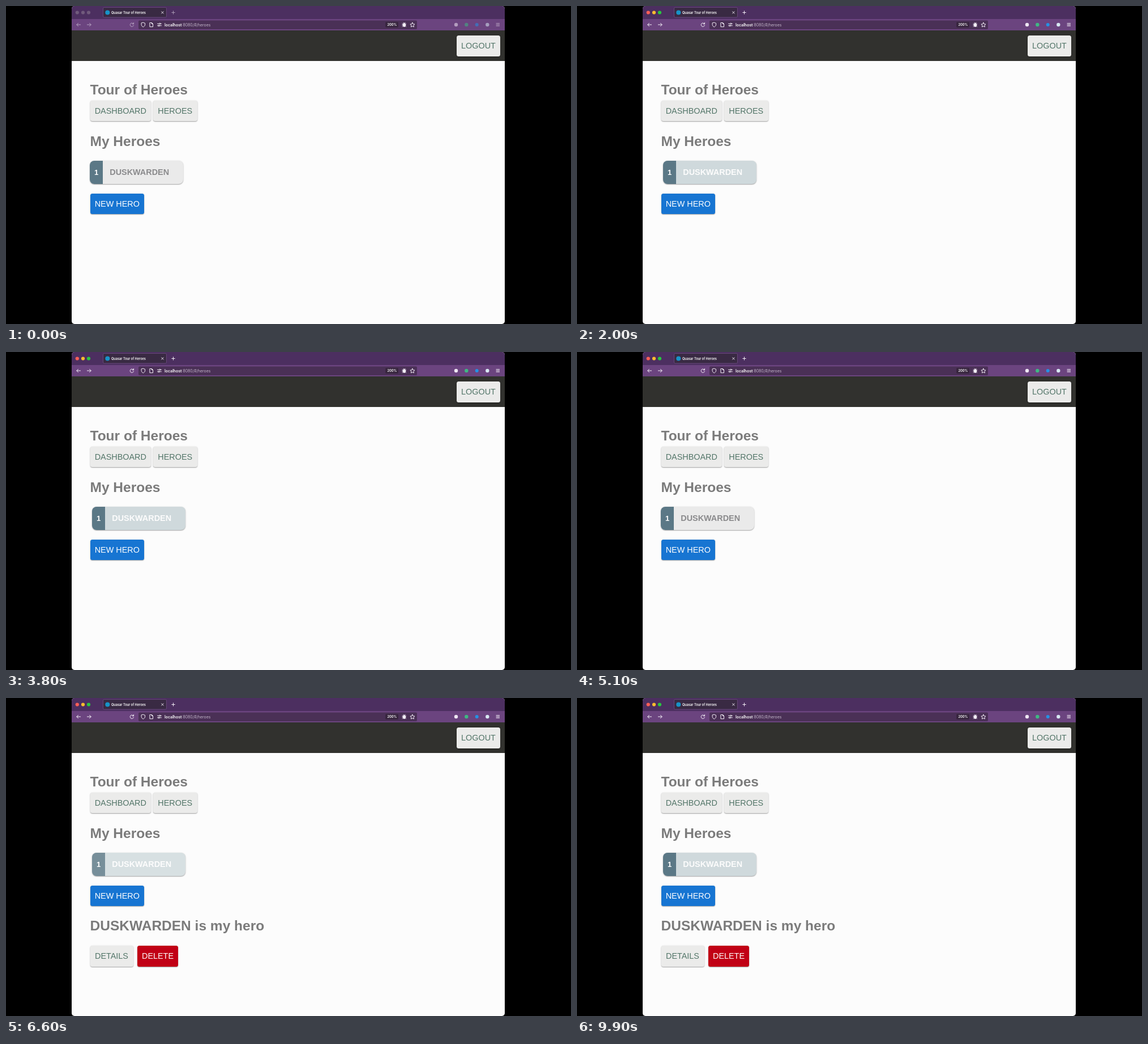
An HTML page that plays this animation: 998 by 561 pixels, repeating every 10 s.

```html
<!DOCTYPE html>
<html lang="en">
<head>
<meta charset="utf-8">
<title>Tour of Heroes</title>
<style>
  html, body { margin: 0; width: 100%; height: 100%; overflow: hidden; background: #000; }
  #stage { position: relative; width: 998px; height: 561px; overflow: hidden;
    font-family: "Liberation Sans", Arial, sans-serif; }
  #window { position: absolute; left: 116px; top: 0; width: 765px; height: 561px;
    border-radius: 5px; background: #fcfcfc; }
  svg { position: absolute; left: 0; top: 0; }
  svg text { font-family: Inter, sans-serif; fill: #fff; }
  .line { fill: none; stroke: #f4eff7; stroke-width: 1; stroke-linecap: round; stroke-linejoin: round; }
  .bar { position: absolute; left: 116px; top: 43px; width: 765px; height: 54px; background: #31312e; }
  .btn, .row { position: absolute; box-sizing: border-box;
    box-shadow: 0 .5px 2.5px rgba(0,0,0,.2), 0 1px 1.5px rgba(0,0,0,.2), 0 1.5px 1px -1px rgba(0,0,0,.12); }
  .btn { display: flex; align-items: center; justify-content: center; height: 36.5px;
    border-radius: 3.5px; font-size: 14.4px; white-space: nowrap; background: #ebebea; color: #527568; }
  .blue { background: #1775d2; color: #fff; }
  .red { background: #c10015; color: #fff; }
  h2 { position: absolute; left: 148.5px; margin: 0; height: 30px; line-height: 30px;
    font-size: 24.5px; font-weight: bold; color: #7b7b7b; white-space: nowrap; }
  .row { left: 148px; top: 273px; width: 165px; height: 41px; line-height: 41px; border-radius: 8px;
    font-size: 14.4px; font-weight: bold; background: #eaeaea; color: #8a8a8c; overflow: hidden; }
  .badge { position: absolute; left: 0; width: 23px; height: 41px; text-align: center;
    font-size: 13px; color: #fff; background: #5b7886; }
  .name { position: absolute; left: 35.3px; }
  .ripple { position: absolute; inset: 0; background: #fff; opacity: 0; }
</style>
</head>
<body>
<div id="stage">
  <div id="window"></div>
  <svg width="998" height="561" viewBox="0 0 998 561">
    <path d="M116 23V5a5 5 0 0 1 5-5H876a5 5 0 0 1 5 5V23Z" fill="#4c2f60"/>
    <path d="M116 23H881V43H116Z" fill="#6b447f"/>
    <rect x="171.5" y="2.5" width="112" height="17.5" rx="2" fill="#392a43" stroke="#76558a" stroke-width=".7"/>
    <rect x="234" y="25.5" width="492" height="15.5" rx="2" fill="#4a3056"/>
    <rect x="670" y="28" width="23" height="10" rx="2" fill="#38263f"/>

    <circle cx="179.3" cy="11.5" r="4" fill="#1793c8"/>
    <text x="186" y="13.6" font-size="5.6" font-weight="600">Quasar Tour of Heroes</text>
    <path class="line" d="M274.7 9.8l3.4 3.4m0-3.4l-3.4 3.4"/>

    <text x="280" y="35.5" font-size="6.9"><tspan font-weight="600">localhost</tspan><tspan fill="#c4b7cb">:8080/#/heroes</tspan></text>
    <text x="681.8" y="35.2" font-size="5.7" font-weight="600" text-anchor="middle">200%</text>
    <g class="line">
      <path d="M242.3 29.2l3.2 1.1v2.6c0 2-1.5 3.3-3.2 4.1c-1.7-.8-3.2-2.1-3.2-4.1v-2.6Z"/>
      <path d="M254.3 29.5h3.2l2 2V36.7h-5.2Zm3.2 0v2h2"/>
      <path d="M267.5 31.3h3m2.7 0h1.2M267.5 34.7h1.2m2.7 0h3"/>
      <circle cx="271.8" cy="31.3" r="1.1"/><circle cx="270" cy="34.7" r="1.1"/>
      <path d="M717.9 29.2l1.2 2.5l2.8.4l-2 2l.5 2.8l-2.5-1.3l-2.5 1.3l.5-2.8l-2-2l2.8-.4Z"/>
      <path d="M700 31l1.2 1m5.4-1l-1.2 1M699.7 33.5h1.5m5.4 0h-1.5M700 36.4l1.2-1m5.4 1l-1.2-1M702 29.2l.6 1m2.3-1l-.6 1"/>
    </g>
    <ellipse cx="703.4" cy="33.4" rx="2.5" ry="3.5" fill="#f4eff7"/>

    <g id="lights">
      <circle cx="125.8" cy="11.5" r="3.1"/>
      <circle cx="136" cy="11.5" r="3.1"/>
      <circle cx="146" cy="11.5" r="3.1"/>
    </g>
    <g id="tools">
      <g class="line">
        <path d="M131.6 33h-6.8m2.7-2.7l-2.7 2.7l2.7 2.7"/>
        <path d="M143.4 33h6.8m-2.7-2.7l2.7 2.7l-2.7 2.7"/>
        <path d="M225 31.3a3.2 3.2 0 1 0 .5 2.8M225.5 29.5v2.3h-2.3"/>
        <path d="M292.8 11.5h5.4m-2.7-2.7v5.4"/>
        <path d="M866 30.7h5.6m-5.6 2.2h5.6m-5.6 2.2h5.6"/>
      </g>
      <circle cx="795" cy="33" r="3.2" fill="#eee6f2"/>
      <circle cx="813.3" cy="33" r="3.2" fill="#3fb883"/>
      <circle cx="831.7" cy="33" r="3" fill="#2492e4"/>
      <circle cx="850.3" cy="33" r="3.2" fill="#d7e8f2"/>
    </g>
  </svg>

  <div class="bar"></div>
  <div class="btn" style="left:796px;top:52px;width:77px">LOGOUT</div>
  <h2 style="top:133px">Tour of Heroes</h2>
  <div class="btn" style="left:148.5px;top:166.8px;width:107.5px">DASHBOARD</div>
  <div class="btn" style="left:260px;top:166.8px;width:77.5px">HEROES</div>
  <h2 style="top:223.5px">My Heroes</h2>
  <div class="row" id="row">
    <div class="badge">1</div>
    <div class="name">DUSKWARDEN</div>
    <div class="ripple" id="ripple"></div>
  </div>
  <div class="btn blue" style="left:148.5px;top:330.5px;width:95.5px">NEW HERO</div>
  <div id="detail">
    <h2 style="top:387px">DUSKWARDEN is my hero</h2>
    <div class="btn" style="left:148.5px;top:437px;width:76px">DETAILS</div>
    <div class="btn red" style="left:232px;top:437px;width:72px">DELETE</div>
  </div>
</div>
<script>
  const LOOP = 10000;
  const $ = id => document.getElementById(id);

  // table: [time in ms, style] pairs; the last style holds to the end of the loop
  function play(el, table, easing = 'step-end') {
    const frames = table.map(([time, style]) => ({ offset: time / LOOP, easing, ...style }));
    frames.push({ ...frames[frames.length - 1], offset: 1 });
    el.animate(frames, { duration: LOOP, iterations: Infinity }).startTime = 0;
  }

  const rest = { transform: 'none', backgroundColor: '#eaeaea', color: '#8a8a8c' };
  const hover = { transform: 'translateX(4px)', backgroundColor: '#cfd9dc', color: '#fcfcfc' };
  play($('row'), [[0, rest], [1500, hover], [2400, rest], [3600, hover], [4600, rest], [5700, hover]]);

  // the window gains focus
  const focusAt = 1200;
  play($('tools'), [[0, { opacity: .55 }], [focusAt, { opacity: 1 }]]);
  ['#ff5f57', '#febc2e', '#28c840'].forEach((color, i) =>
    play($('lights').children[i], [[0, { fill: '#705a7c' }], [focusAt, { fill: color }]]));

  // clicking the row opens the detail section
  play($('detail'), [[0, { visibility: 'hidden' }], [6500, { visibility: 'visible' }]]);
  play($('ripple'), [[0, { opacity: 0 }], [6400, { opacity: 0 }], [6550, { opacity: .17 }],
    [6650, { opacity: .17 }], [6900, { opacity: 0 }]], 'linear');

  // every track shares one start, so the loop begins on load
  const start = performance.now();
  document.getAnimations().forEach(track => { track.startTime = start; });
</script>
</body>
</html>
```
